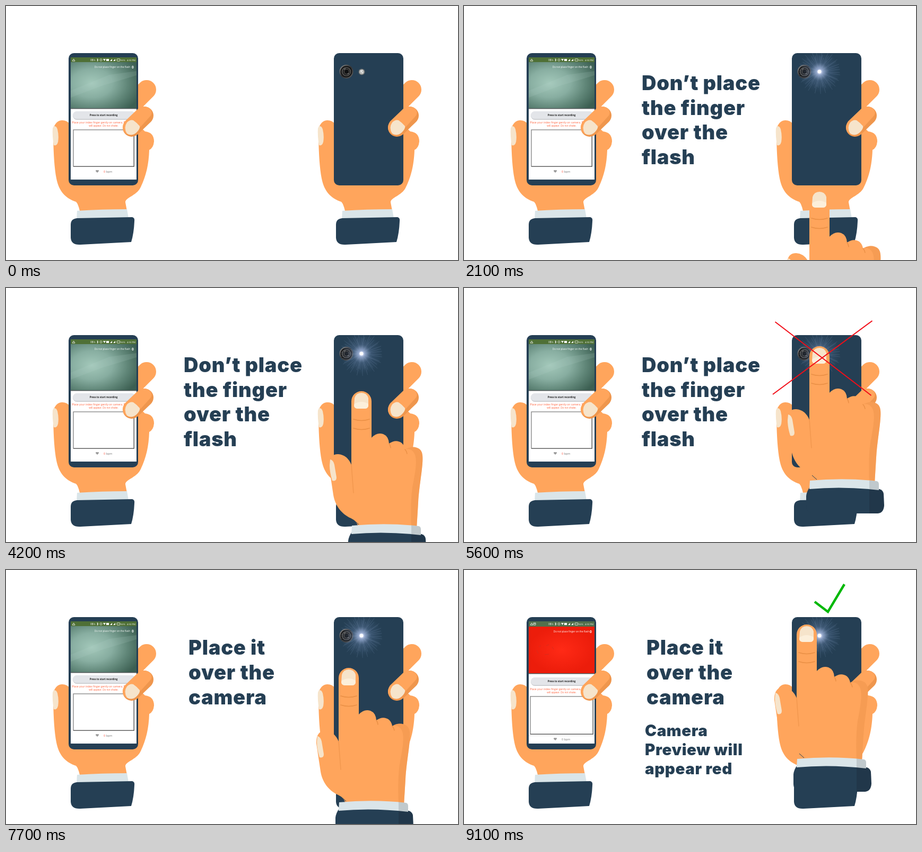
An HTML page that plays this animation: 852x480 px, repeating every 9800 ms.

```html
<!DOCTYPE html>
<html lang="en">
<head>
<meta charset="utf-8">
<title>Finger placement guide</title>
<style>
  html, body { margin: 0; width: 100%; height: 100%; overflow: hidden; background: #fff; }
  svg { display: block; width: 852px; height: 480px; }
  text { font-family: "Open Sans", sans-serif; }
  .caption text { font-family: Inter, sans-serif; font-weight: 900; letter-spacing: .02em; fill: #253f54; }
  .skin { fill: #ffa55c; }
  .shade { fill: #ef964d; }
  .nail { fill: #f6e4cb; }
  .navy { fill: #253f54; }
  .cuff { fill: #dae5e9; }
  .line { fill: none; stroke: #ea9046; stroke-width: 1.5; stroke-linecap: round; }
</style>
</head>
<body>
<svg id="stage" viewBox="0 0 852 480"></svg>
<script>
const FRAME = 700, FRAME_COUNT = 14;

const defs = `<defs>
  <radialGradient id="preview" cx=".32" cy=".46" r=".78">
    <stop offset="0" stop-color="#a3c8ba"/><stop offset=".4" stop-color="#88aea1"/>
    <stop offset=".7" stop-color="#608678"/><stop offset="1" stop-color="#3c5f52"/>
  </radialGradient>
  <radialGradient id="redPreview"><stop offset="0" stop-color="#ff2a16"/><stop offset="1" stop-color="#ec1d0b"/></radialGradient>
  <radialGradient id="glow">
    <stop offset="0" stop-color="#fff"/><stop offset=".18" stop-color="#cdd7fa" stop-opacity=".85"/>
    <stop offset=".45" stop-color="#7896c8" stop-opacity=".3"/><stop offset="1" stop-color="#6688b8" stop-opacity="0"/>
  </radialGradient>
  <linearGradient id="lens" x2="1" y2="1">
    <stop offset="0" stop-color="#999"/><stop offset=".5" stop-color="#333"/><stop offset="1" stop-color="#666"/>
  </linearGradient>
  <clipPath id="body"><rect x="618" y="89" width="131" height="250" rx="10"/></clipPath>
  <clipPath id="screen"><rect x="122" y="97" width="124" height="231"/></clipPath>
</defs>`;

const gripBack = `
  <path class="skin" d="M89 232Q94 216 106 216Q115 216 120 223H247L262 237Q279 239 279 256Q278 268 270 272
    C269 300 264 322 253 344C246 358 225 362 225 371L228 387H139Q136 374 132 370C112 363 100 351 95 326
    C90 300 89 262 89 232Z"/>
  <path d="M265 158L240 183" stroke="#ffa55c" stroke-width="36" stroke-linecap="round"/>
  <path class="nail" d="M90 227Q95 226 97 233Q100 246 98 257Q96 265 90 263Q87 246 88 231Z"/>
  <path class="cuff" d="M134 387Q180 384 228 384L231 401L133 404Z"/>
  <path class="navy" d="M134 401L238 399Q243 400 242 407Q241 430 236 446L140 451Q123 452 122 438V413Q122 402 134 401Z"/>
  <rect class="navy" x="118" y="89" width="131" height="250" rx="10"/>`;

const gripFinger = `
  <path d="M237 230L261 207" stroke="#ef964d" stroke-width="34" stroke-linecap="round"/>
  <path class="skin" d="M224 218L249 194Q261 186 271 194Q277 200 273 207L244 239Q236 247 226 241Q215 232 224 218Z"/>
  <path class="nail" d="M228 220Q234 214 240 216Q246 220 252 227Q253 232 246 239Q237 247 228 241Q221 230 228 220Z"/>`;

const label = (x, y, size, fill, text, extra = "") =>
  `<text x="${x}" y="${y}" font-size="${size}" fill="${fill}" ${extra}>${text}</text>`;

function screen(red) {
  const middle = 'text-anchor="middle"', end = 'text-anchor="end"';
  const top = red ? 107 : 106, bottom = red ? 195 : 193;
  const buttonY = red ? 203 : 199, noteY = red ? 227 : 222;
  const [x, y, w, h] = red ? [125, 239, 118, 71] : [127, 234, 114, 69];
  const footY = red ? 322 : 315;
  return `<g clip-path="url(#screen)">
    <rect x="122" y="97" width="124" height="231" fill="#fff"/>
    <rect x="122" y="97" width="124" height="10" fill="${red ? "#52704c" : "#4f7036"}"/>
    <path d="M125 104L127.5 100L130 104Z" fill="none" stroke="#fff" stroke-width=".8"/>
    ${red ? '<path d="M131 100h4v4h-4zl2 2l2-2" fill="none" stroke="#fff" stroke-width=".7"/>' : ""}
    ${label(159, 104, 4.5, "#fff", "0B/s")}
    <path d="M171 100l3 3l-1.5 1.5v-5l1.5 1.5l-3 3" fill="none" stroke="#fff" stroke-width=".6"/>
    <circle cx="179" cy="102" r="2" fill="none" stroke="#fff" stroke-width=".7"/>
    <path d="M183 100h5l-2.500 4zM189 100h5v4h-5zM196 104l4-4v4zM202 104l4-4v4z" fill="#fff"/>
    <rect x="209" y="100" width="6" height="4" rx="1" fill="none" stroke="#fff" stroke-width=".8"/>
    ${label(216, 104, 4.3, "#fff", "36%")}${label(244, 104, 4.3, "#fff", "4:50 PM", end)}
    <rect x="122" y="${top}" width="124" height="${bottom - top}" fill="url(#${red ? "redPreview" : "preview"})"/>
    ${red ? '<path d="M141 145l4-2m10 0l5-2m6 4l3 5m-32 2l3 6m12 2l8-1" stroke="#d92b1c" stroke-width="1" fill="none"/>'
      : '<path d="M122 160L195 130L246 123V131L180 151L122 173Z" fill="#bad5ca" opacity=".14"/>'}
    ${label(red ? 236 : 234, red ? 118 : 117, 4.6, "#fff", "Do not place finger on the flash", end)}
    ${label(237, red ? 119 : 118, 6.5, "#fff", "0", 'font-weight="700"')}
    <path d="M122 ${bottom + .7}H246" stroke="#4e5657" stroke-width="1.6"/>
    <rect x="126" y="${buttonY + 1}" width="118" height="15" rx="7.500" fill="#c6c8cb"/>
    <rect x="126" y="${buttonY}" width="118" height="14.500" rx="7.200" fill="#e3e5e9"/>
    ${label(184, buttonY + 9, 4.5, "#222", "Press to start recording", middle + ' font-weight="700"')}
    ${label(184, noteY, 5, "#ff613b", "Place your index finger gently on camera. Red color", middle)}
    ${label(184, noteY + 6, 4.6, "#ff613b", "will appear. Do not shake.", middle)}
    <rect x="${x}" y="${y}" width="${w}" height="${h}" fill="#fff" stroke="#777" stroke-width="1.2"/>
    <path d="M${x} ${y + h + .5}H${x + w + .5}V${y}" fill="none" stroke="#606060"/>
    ${red ? '<path d="M122 313H246" stroke="#ddd"/>' : ""}
    <path d="M172 ${footY}l-3-3q0-3 3-1.500q3-1.500 3 1.500Z" fill="#999"/>
    ${label(184, footY, 5.5, "#777", `<tspan fill="${red ? "#777" : "#ff513b"}">0</tspan> bpm`)}
  </g>`;
}

const camera = `
  <circle cx="641.500" cy="124" r="13" fill="url(#lens)"/>
  <circle cx="641.500" cy="124" r="11" fill="#171819"/>
  <circle cx="641.500" cy="124" r="8" fill="#262728" stroke="#6a6763" stroke-width="1.2"/>
  <circle cx="642" cy="124" r="4.500" fill="#101112" stroke="#55524f"/>
  <path d="M637 120l3-2m4 11l2-2" stroke="#aaa"/>
  <circle cx="670.500" cy="124.500" r="6" fill="#6d7070"/>
  <circle cx="670.500" cy="124.500" r="4.500" fill="#b9bbb9"/>
  <path d="M668 122l5 5m-1-6l-3 3" stroke="#ededed" stroke-width="1.3"/>`;

const rays = Array.from({ length: 70 }, (_, i) => {
  const angle = i * Math.PI / 35 + .04 * Math.sin(i * 5);
  const length = 18 + 24 * Math.abs(Math.sin(i * 7.3));
  return `M0 0L${(length * Math.cos(angle)).toFixed(1)} ${(length * Math.sin(angle)).toFixed(1)}`;
}).join("");

const flash = `<g clip-path="url(#body)"><g transform="translate(670 124)">
  <circle r="39" fill="url(#glow)" opacity=".7"/>
  <path d="${rays}" stroke="#b0c9ee" stroke-width=".6" opacity=".25"/>
  <circle r="14" fill="url(#glow)"/><circle r="3.500" fill="#fff"/>
</g></g>`;

const pointingHand = `
  <path class="skin" d="M651 129A19 19 0 0 1 689 129V198Q699 187 711 191Q721 195 722 209
    Q735 200 746 208Q751 213 752 220Q763 213 775 217Q784 220 785 231C787 250 779 285 777 320L774 370H665
    Q662 355 650 350C632 342 620 325 617 306L609 253Q608 229 626 229Q643 230 651 249Z"/>
  <path class="shade" opacity=".55" d="M752 220Q763 213 775 217Q784 220 785 231C787 250 779 285 777 320L774 368H764
    Q762 320 766 292C772 260 778 231 765 222Q760 218 752 220Z"/>
  <path class="line" d="M722 209Q725 213 725 217M752 220Q755 223 756 228"/>
  <path class="line" opacity=".6" d="M651 249Q653 275 655 302"/>
  <path class="line" d="M655 163Q670 168 685 163M655 180Q670 185 685 180"/>
  <path class="nail" d="M657 123Q660 113 670 113Q680 113 683 123V138Q682 143 676 143H662Q656 142 656 137Z"/>
  <path d="M657 134Q670 126 683 134V138Q682 143 676 143H662Q656 142 656 137Z" fill="#fff4e4" opacity=".65"/>
  <path class="nail" d="M611 239Q617 240 619 249L623 273Q623 281 615 279Q610 263 610 250Z"/>
  <path class="navy" d="M652 376Q720 374 783 380Q790 382 791 389L792 411Q791 425 780 426H659Q645 425 645 411V393Q646 384 652 376Z"/>
  <path class="cuff" d="M652 364Q718 358 778 365Q782 366 782 371V382Q715 374 651 380Z"/>
  <path d="M764 363.500L778 365Q782 366 782 371V380Q790 382 791 389L792 411Q791 425 780 426H764Z" opacity=".12"/>
  <path d="M656 354L665 362" stroke="#253f54"/>`;

const caption = (id, x, y, size, pitch, lines) =>
  `<g class="caption" id="${id}">${lines.map((line, i) =>
    `<text x="${x}" y="${y + i * pitch}" font-size="${size}">${line}</text>`).join("")}</g>`;

document.getElementById("stage").innerHTML = `${defs}
  ${gripBack}<g id="idleScreen">${screen(false)}</g><g id="redScreen">${screen(true)}</g>${gripFinger}
  <g transform="translate(500 0)">${gripBack}${gripFinger}</g>
  ${camera}<g id="flash">${flash}</g><g id="hand">${pointingHand}</g>
  <path id="cross" d="M586.5 64L767.5 203M769.500 62L582 201" stroke="#f20d18" stroke-width="2"/>
  <path id="check" d="M661 60L686 79L717 27" fill="none" stroke="#00b807" stroke-width="4.500"/>
  ${caption("warning", 335, 159, 38, 46.7, ["Don’t place", "the finger", "over the", "flash"])}
  ${caption("advice", 344, 160, 38, 47, ["Place it", "over the", "camera"])}
  ${caption("result", 341, 314, 29.5, 36, ["Camera", "Preview will", "appear red"])}`;

const part = id => document.getElementById(id);
const show = (id, visible) => part(id).style.display = visible ? "" : "none";

// Hand offset from its resting place over the flash.
function handOffset(step) {
  if (step < 3) return null;
  if (step < 7) return [0, 238 - (step - 3) * 51];
  if (step < 9) return [0, 0];
  if (step < 12) return [-24, 208 - (step - 9) * 66.5];
  return [-24, -7];
}

function draw(now) {
  const step = Math.floor(now / FRAME) % FRAME_COUNT;
  const offset = handOffset(step);
  show("hand", offset);
  if (offset) part("hand").setAttribute("transform", `translate(${offset})`);
  show("warning", step >= 1 && step < 9);
  show("flash", step >= 2);
  show("cross", step === 8);
  show("advice", step >= 9);
  for (const id of ["result", "check", "redScreen"]) show(id, step === 13);
  show("idleScreen", step !== 13);
}

const start = performance.now();
function tick() {
  draw(performance.now() - start);
  requestAnimationFrame(tick);
}
tick();
</script>
</body>
</html>
```
